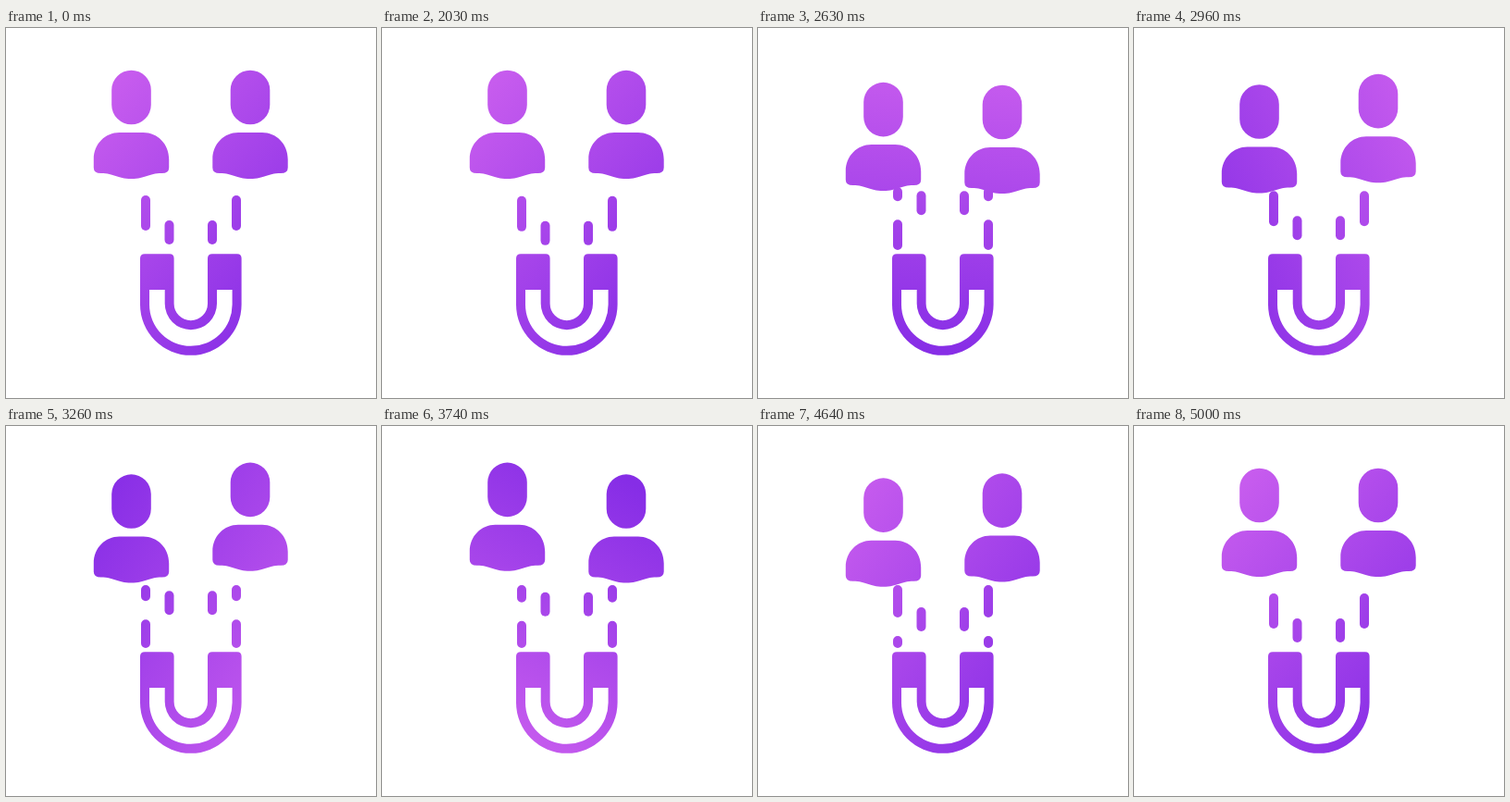
An HTML page with a canvas that plays this animation: 400x400 px, repeating every 5120 ms.

```html
<!DOCTYPE html>
<html lang="en">
<head>
<meta charset="utf-8">
<title>Magnet and people</title>
<style>
  html, body { margin: 0; width: 100%; height: 100%; overflow: hidden; background: #fff; }
  canvas { display: block; }
</style>
</head>
<body>
<canvas id="stage" width="400" height="400"></canvas>
<script>
const ctx = document.getElementById('stage').getContext('2d');
const LOOP = 5120, START = 2000, END = 5000, STEP = 30;
const { PI, sin, cos } = Math;

const person = new Path2D(
  'M-21.3 67A21.3 21.3 0 0 1 21.3 67V83A21.3 21.3 0 0 1-21.3 83Z' +
  'M-40.7 142C-40.7 125-28 113-13 113H13C28 113 40.7 125 40.7 142V151' +
  'Q40.7 157 33 157C18 157 16 163 0 163S-18 157-33 157Q-40.7 157-40.7 151Z');
const magnet = new Path2D(
  'M150 244.3H177Q181.6 244.3 181.6 249V298A18.2 18.2 0 0 0 218 298V249Q218 244.3 223 244.3' +
  'H250Q254.6 244.3 254.6 249V299A54.8 54.8 0 0 1 145 299V249Q145 244.3 150 244.3Z' +
  'M155 283H171.7V298A28.1 28.1 0 0 0 228 298V283H244.6V299A44.8 44.8 0 0 1 155 299Z');

// Bends progress ahead of (positive) or behind (negative) an even pace.
const bend = (u, amount) => u + amount * sin(PI * u);
const easeInOut = u => (1 - cos(PI * u)) / 2;

// Two dips per run with a rise above the resting place between them.
const bob = v => 6.4 - 9.6 * cos(4 * PI * v) + 3.2 * cos(2 * PI * v);

// Four passes of the dashes, fastest halfway.
const flow = u => 4 * u - 0.4 * sin(2 * PI * u);

function rotatingGradient(degrees) {
  const angle = degrees * PI / 180;
  const dx = 155 * cos(angle), dy = 155 * sin(angle);
  const gradient = ctx.createLinearGradient(200 - dx, 200 - dy, 200 + dx, 200 + dy);
  gradient.addColorStop(0, '#c75cee');
  gradient.addColorStop(1, '#862de6');
  return gradient;
}

// The fill is positioned in stage space, so build a moved copy of the shape.
function drawPerson(x, y) {
  const shape = new Path2D();
  shape.addPath(person, new DOMMatrix([1, 0, 0, 1, x, y]));
  ctx.fill(shape);
}

function drawDashes(columns, start, length, shift) {
  const top = 177, period = 58;
  ctx.setLineDash([length, period - length]);
  ctx.lineDashOffset = -(start + shift * period) % period;
  for (const x of columns) {
    ctx.beginPath();
    ctx.moveTo(x, top);
    ctx.lineTo(x, top + period);
    ctx.stroke();
  }
}

function draw(now) {
  const elapsed = Math.max(0, now % LOOP - START);
  const u = Math.min(1, Math.floor(elapsed / STEP) * STEP / (END - START));
  const early = bend(u, 0.065), late = bend(u, -0.065);

  ctx.fillStyle = '#fff';
  ctx.fillRect(0, 0, 400, 400);
  ctx.fillStyle = ctx.strokeStyle = rotatingGradient(42 + 360 * easeInOut(early));
  ctx.lineWidth = 10;
  ctx.lineCap = 'round';

  drawDashes([151, 249], 9, 28, flow(u));
  drawDashes([176.5, 223], 36, 16, flow(u));
  drawPerson(135.5, bob(late));
  drawPerson(264, bob(early));
  ctx.fill(magnet, 'evenodd');
}

const begin = performance.now();
function tick() {
  draw(performance.now() - begin);
  requestAnimationFrame(tick);
}
tick();
</script>
</body>
</html>
```
